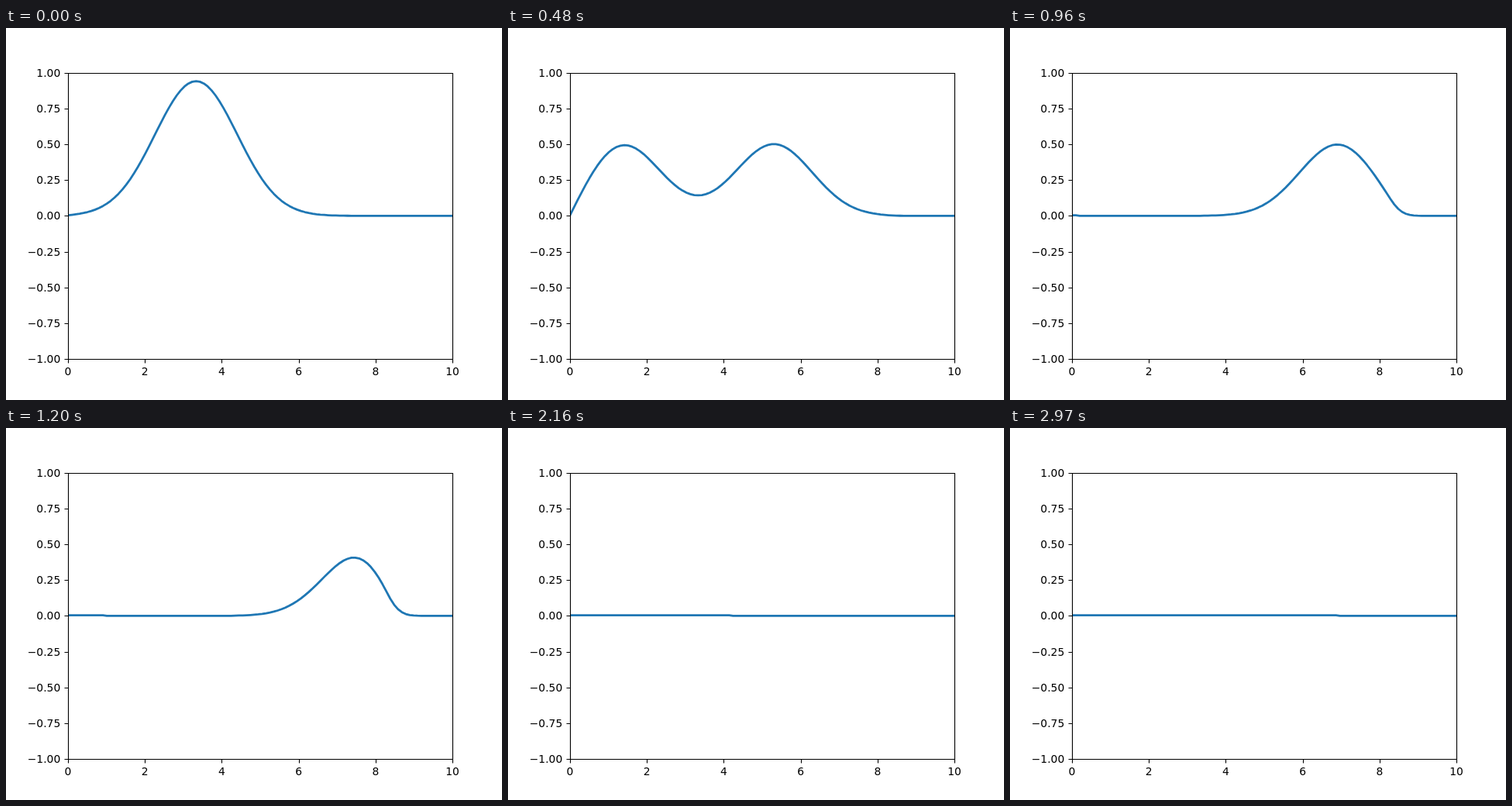
Write an HTML page with a canvas that moves like this. It is 640x480 px and loops after 3 s.

```html
<!DOCTYPE html>
<html lang="en">
<head>
<meta charset="utf-8">
<title>Wave pulse</title>
<style>
  html, body { margin: 0; width: 100%; height: 100%; overflow: hidden; background: #fff; }
  canvas, svg { position: absolute; left: 0; top: 0; width: 640px; height: 480px; }
  text { font: 13.889px "DejaVu Sans", Verdana, sans-serif; fill: #000; }
</style>
</head>
<body>
<canvas id="plot" width="640" height="480"></canvas>
<svg id="labels" viewBox="0 0 640 480"></svg>
<script>
const LEFT = 80, TOP = 57.6, WIDTH = 496, HEIGHT = 369.6;
const RIGHT = LEFT + WIDTH, BOTTOM = TOP + HEIGHT;
const POINTS = 100, FRAMES = 100, FRAME_MS = 30, WARMUP = 3;
const SPONGE_START = 8.24, SPONGE_CELLS = 17;

const ctx = document.getElementById("plot").getContext("2d");
const labels = document.getElementById("labels");

const dx = 10 / (POINTS - 1);
const px = x => LEFT + x / 10 * WIDTH;
const py = y => TOP + (1 - y) / 2 * HEIGHT;
const snap = v => Math.floor(v + 0.5) + 0.5;

// Wave equation at one cell per step: fixed ends, no negative heights,
// and a sponge that swallows the wave near the right end.
function simulate() {
  const mask = Array.from({ length: POINTS }, (_, i) =>
    1 - Math.min(1, Math.max(0, (i * dx - SPONGE_START) / dx / SPONGE_CELLS)));
  let now = Array.from({ length: POINTS }, (_, i) => Math.exp(-((i * dx - 10 / 3) ** 2) / 2));
  let prev = now;
  const out = [];
  for (let step = 1; step < FRAMES + WARMUP; step++) {
    const next = now.map((u, i) => i === 0 || i === POINTS - 1
      ? u
      : Math.max(0, mask[i] * (now[i - 1] + now[i + 1] - prev[i])));
    prev = now;
    now = next;
    if (step >= WARMUP) out.push(now);
  }
  return out;
}

function addLabel(text, x, y, anchor) {
  const el = document.createElementNS("http://www.w3.org/2000/svg", "text");
  el.setAttribute("x", x);
  el.setAttribute("y", y);
  el.setAttribute("text-anchor", anchor);
  el.textContent = text;
  labels.appendChild(el);
}

const xTicks = [0, 2, 4, 6, 8, 10];
const yTicks = Array.from({ length: 9 }, (_, i) => 1 - i / 4);

xTicks.forEach(v => addLabel(String(v), px(v), 448, "middle"));
yTicks.forEach(v => addLabel((v < 0 ? "\u2212" : "") + Math.abs(v).toFixed(2),
  70.28, Math.round(py(v)) + 5, "end"));

function drawCurve(u) {
  ctx.save();
  ctx.beginPath();
  ctx.rect(LEFT, TOP, WIDTH, HEIGHT);
  ctx.clip();
  ctx.beginPath();
  u.forEach((y, i) => ctx.lineTo(px(i * dx), py(y)));
  ctx.strokeStyle = "#1f77b4";
  ctx.lineWidth = 2.778;
  ctx.lineJoin = "round";
  ctx.lineCap = "square";
  ctx.stroke();
  ctx.restore();
}

function drawAxes() {
  const l = snap(LEFT), b = snap(BOTTOM);
  ctx.strokeStyle = "#000";
  ctx.lineWidth = 1.111;
  ctx.beginPath();
  for (const v of xTicks) {
    ctx.moveTo(snap(px(v)), b);
    ctx.lineTo(snap(px(v)), b + 5);
  }
  for (const v of yTicks) {
    ctx.moveTo(l, snap(py(v)));
    ctx.lineTo(l - 5, snap(py(v)));
  }
  ctx.rect(l, snap(TOP), snap(RIGHT) - l, b - snap(TOP));
  ctx.stroke();
}

const frames = simulate();

function draw(time) {
  const frame = Math.floor(Math.max(0, time) / FRAME_MS) % FRAMES;
  ctx.fillStyle = "#fff";
  ctx.fillRect(0, 0, 640, 480);
  drawCurve(frames[frame]);
  drawAxes();
}

function loop(time) {
  draw(time);
  requestAnimationFrame(loop);
}

draw(0);
requestAnimationFrame(loop);
</script>
</body>
</html>
```
